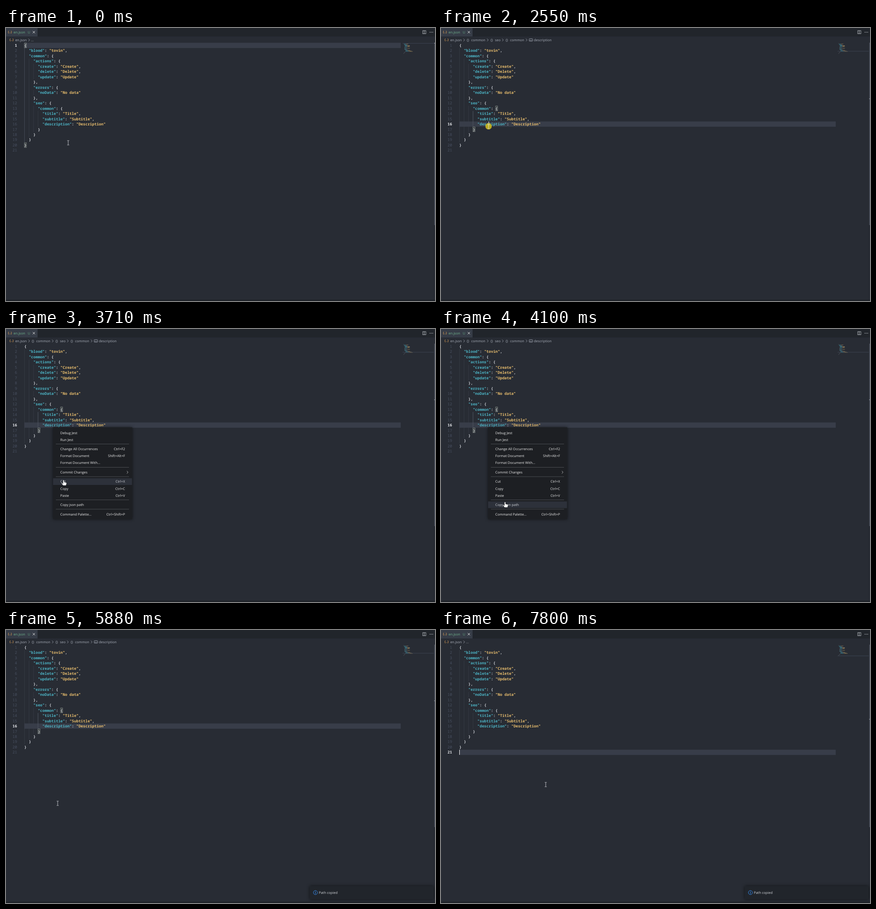
An HTML page that plays this animation: 938 px wide and 597 px high, repeating every 8000 ms.

```html
<!DOCTYPE html>
<html lang="en">
<head>
<meta charset="utf-8">
<title>Copy JSON path</title>
<style>
html, body { margin: 0; width: 100%; height: 100%; overflow: hidden; background: #282c34; }
svg { display: block; font: 7.45px "Open Sans", "Noto Sans", sans-serif; }
text { white-space: pre; text-rendering: geometricPrecision; }
.code { font: 600 8.24px "Noto Sans Mono", "DejaVu Sans Mono", monospace; }
.num { font-weight: 400; fill: #495162; text-anchor: end; }
.num.on { font-weight: 600; fill: #e4e6ea; }
.key { fill: #4db5c6; }
.str { fill: #e9be6e; }
.punct { fill: #d2d5db; }
.crumb { fill: #a9afba; }
.line { fill: none; stroke: #a9afba; stroke-width: .8; }
.menu { fill: #ececec; }
.menu .hover { fill: #cfd2d8; }
.float { filter: drop-shadow(0 0 3px #0009); }
</style>
</head>
<body>
<svg id="stage" width="938" height="597" viewBox="0 0 938 597"></svg>
<script>
const LOOP = 8000;
const ROW = 11.475, TOP = 32.3, LEFT = 40, CHAR = 4.944;

const data = {
  blood: "tovin",
  common: {
    actions: { create: "Create", delete: "Delete", update: "Update" },
    errors: { noData: "No data" },
    seo: { common: { title: "Title", subtitle: "Subtitle", description: "Description" } }
  }
};
const lines = JSON.stringify(data, null, 2).split("\n").concat("");

const rowTop = n => TOP + (n - 1) * ROW;
const miniY = n => 33 + (n - 1) * 1.16;
const colX = c => LEFT + c * CHAR;

const rect = (x, y, w, h, fill, more = "") =>
  `<rect x="${x}" y="${y}" width="${w}" height="${h}" fill="${fill}" ${more}/>`;
const text = (x, y, s, more = "") => `<text x="${x}" y="${y}" ${more}>${s}</text>`;
const path = (d, more = 'class="line"') => `<path d="${d}" ${more}/>`;
const group = (id, body, more = "") => `<g id="${id}" ${more}>${body}</g>`;
const chevron = (x, y, more) => path(`M${x - 1.4} ${y - 2.8}l2.8 2.8-2.8 2.8`, more);

function tokens(line) {
  const found = [];
  for (const m of line.matchAll(/"[^"]*"(?=(:?))|[^\s"]+/g)) {
    const kind = m[0][0] !== '"' ? "punct" : m[1] ? "key" : "str";
    found.push({ col: m.index, s: m[0], kind });
  }
  return found;
}

function codeRows() {
  return lines.map((line, i) => {
    const y = rowTop(i + 1) + 8.6;
    return text(24.2, y, i + 1, 'class="code num"') +
      tokens(line).map(t => text(colX(t.col), y, t.s, `class="code ${t.kind}"`)).join("");
  }).join("");
}

function miniMap() {
  return lines.map((line, i) => tokens(line).map(t =>
    rect(869 + t.col * .56, miniY(i + 1) + .4, t.s.length * .56, .75, "currentColor",
      `class="${t.kind}" opacity=".6"`)).join("")).join("");
}

// Vertical guides: column, first row, last row
const guides = [[0, 2, 19], [2, 4, 18], [4, 5, 7], [4, 10, 10], [4, 13, 17], [6, 14, 16]];
const guide = ([c, a, b], color) =>
  rect(colX(c), rowTop(a), .7, rowTop(b + 1) - rowTop(a), color);

const brace = (row, col) =>
  rect(colX(col) + .1, rowTop(row) + .6, CHAR - .3, ROW - 1.2, "#7c8a6422",
    'stroke="#868d8a" stroke-width=".8"');

const jsonIcon = (x, y) => text(x, y, "{..}", 'fill="#d39a55" font-size="7" font-weight="600"');

function crumbs() {
  const part = (x, s) => text(x, 28.9, s, 'class="crumb"');
  const obj = x => part(x, "{}");
  const sep = [102, 135, 187].map(x => chevron(x, 26.2)).join("");
  const word = rect(192.8, 23.4, 7.4, 5.4, "none", 'rx=".8" stroke="#a9afba" stroke-width=".8"') +
    text(196.5, 27.6, "abc", 'class="crumb" font-size="3.6" text-anchor="middle"');
  return group("shortCrumb", part(54.7, "...")) +
    group("fullCrumb", obj(56) + part(66, "common") + obj(108) + part(118, "seo") +
      obj(141) + part(151, "common") + sep + word + part(203, "description"));
}

const items = [
  [227, "Debug Jest"], [242, "Run Jest"],
  [262.5, "Change All Occurrences", "Ctrl+F2"], [277.6, "Format Document", "Shift+Alt+F"],
  [292.8, "Format Document With..."], [313.3, "Commit Changes"],
  [333.7, "Cut", "Ctrl+X"], [348.9, "Copy", "Ctrl+C"], [364, "Paste", "Ctrl+V"],
  [384.4, "Copy json path"], [404.9, "Command Palette...", "Ctrl+Shift+P"]
];

function menu() {
  const seps = [251.5, 302.6, 322.9, 373.7, 394]
    .map(y => rect(109, y - .4, 160, .8, "#55585d")).join("");
  const rows = items.map(([y, name, keys]) => `<g class="item">` + text(118.8, y + 2.6, name) +
    (keys ? text(260.3, y + 2.6, keys, 'text-anchor="end"') : "") + "</g>").join("");
  return group("menu", rect(103, 215, 173, 201, "#1d1f23", 'class="float"') +
    rect(103, 0, 172.5, 14.6, "#2d313a", 'id="hoverBar"') + seps + rows +
    chevron(265.6, 313.3, 'fill="none" stroke="#e0e0e0" stroke-width=".8"'), 'class="menu"');
}

const toast = () => group("toast",
  rect(664, 560, 271, 29, "#21252b", 'class="float"') +
  `<circle cx="676.5" cy="574.2" r="4.4" fill="none" stroke="#3794ff" stroke-width=".9"/>` +
  rect(676, 573.3, 1, 3.4, "#3794ff") + rect(676, 571.5, 1, 1, "#3794ff") +
  text(684, 576.9, "Path copied", 'fill="#d2d5da"'));

const pointers = () =>
  `<circle id="click" r="7" fill="#d8c51c" opacity=".82"/>` +
  group("beam", path("M-2.2-4.8H-.6L0-4.4.6-4.8H2.2M0-4.4V4.4M-2.2 4.8H-.6L0 4.4.6 4.8H2.2",
    'fill="none" stroke="#d8dade" stroke-width=".85"')) +
  group("hand", path("M-1.3.8Q0-1 1.3.8V4.6L5.2 5.4Q6.8 5.9 6.8 7.5L5.6 12.2H-1L-4.6 7.6Q-4.4 6-2.9 6.8L-1.3 8.2Z",
    'fill="#fff" stroke="#15171a" stroke-width=".7"')) +
  group("arrow", path("M0 0V11L2.6 8.6 4.3 12.3 6 11.5 4.3 8H7.6Z",
    'fill="#fff" stroke="#15171a" stroke-width=".6"'));

const stage = document.getElementById("stage");
stage.innerHTML =
  rect(0, 0, 938, 597, "#282c34") +
  rect(0, 0, 938, 18.6, "#21252b") + rect(0, 0, 69, 18.6, "#363c47") +
  jsonIcon(4, 11.4) + text(16.5, 11.9, "en.json", 'fill="#6fb58d"') +
  text(47.5, 11.9, "U", 'fill="#62a37e"') +
  path("M58.4 6.6l5 5m0-5l-5 5", 'stroke="#f0f0f0" stroke-width=".9"') +
  rect(911.2, 5.8, 6.8, 6.8, "none", 'stroke="#c9ccd2" stroke-width=".8"') +
  rect(914.2, 5.8, .8, 6.8, "#c9ccd2") +
  [927, 930, 933].map(x => `<circle cx="${x}" cy="9.3" r=".8" fill="#c9ccd2"/>`).join("") +
  jsonIcon(7.6, 28.4) + text(20.2, 28.9, "en.json", 'class="crumb"') + chevron(50.4, 26.2) + crumbs() +
  rect(LEFT, 0, 823, ROW, "#383d49", 'id="rowBar"') +
  guides.map(g => guide(g, "#3a3f49")).join("") +
  group("outer", guide(guides[0], "#4b515d") + brace(1, 0) + brace(20, 0)) +
  group("inner", guide(guides[5], "#59606d") + brace(13, 16) + brace(17, 6)) +
  codeRows() + miniMap() +
  rect(867, 0, 69, .9, "#3d4554", 'id="miniBar"') +
  rect(935.4, 32, .6, 562, "#20242b") + rect(936, 32, 2, 399, "#454b57") +
  rect(936, 0, 2, 1.4, "#8a909b", 'id="tick"') +
  rect(0, 594, 938, 3, "#1f2329") +
  rect(0, 0, 1, ROW - .3, "#fff", 'id="caret"') +
  toast() + menu() + pointers();

const el = id => document.getElementById(id);
const show = (id, on) => el(id).setAttribute("visibility", on ? "visible" : "hidden");
const place = (id, x, y) => el(id).setAttribute("transform", `translate(${x} ${y})`);
const nums = [...document.querySelectorAll(".num")];
const rows = [...document.querySelectorAll(".item")];

// Pointer moves in hops: start, end, hop count, way points
const moves = [
  [760, 1300, 8, [[138, 249], [140, 244], [130, 230], [114, 214], [110, 212]]],
  [1530, 1760, 4, [[109, 213], [104, 215]]],
  [3330, 4100, 11, [[106, 242], [118, 300], [131, 350], [137, 370], [140, 378]]],
  [4170, 4250, 2, [[140, 384], [139, 389]]],
  [5240, 6040, 11, [[139, 389], [139, 389], [139, 389], [126, 384], [113, 379], [112, 379]]],
  [6110, 6730, 9, [[130, 386], [300, 440], [520, 520], [650, 568], [690, 578]]],
  [7190, 7800, 9, [[670, 570], [428, 447], [250, 348], [229, 338], [229, 338]]]
];
const caretOn = [[210, 760], [1220, 1760], [2240, 2623], [5400, 5880], [6380, 6880], [7380, LOOP]];
const clicks = [[2470, 2700], [5240, 5400], [7570, 7720]];
const within = (t, spans) => spans.some(([a, b]) => t >= a && t < b);

function pointerAt(t) {
  const move = moves.filter(m => t >= m[0]).pop();
  if (!move) return [136, 251];
  const [a, b, hops, pts] = move;
  const hop = Math.min(hops - 1, Math.floor((t - a) / (b - a) * (hops - 1) + .01));
  const u = hop / (hops - 1) * (pts.length - 1);
  const i = Math.min(pts.length - 2, Math.floor(u));
  return [0, 1].map(k => pts[i][k] + (pts[i + 1][k] - pts[i][k]) * (u - i));
}

function draw(t) {
  const row = t < 2547 ? 1 : t < 7650 ? 16 : 21;
  const menuOpen = t >= 2623 && t < 5400;
  const [x, y] = pointerAt(t);
  const hover = menuOpen ? items.findIndex(i => Math.abs(i[0] - y) < 7.6) : -1;
  const onToast = t > 5480 && x > 664 && y > 560;
  const kind = hover >= 0 ? "hand" : menuOpen || onToast ? "arrow" : "beam";

  el("rowBar").setAttribute("y", rowTop(row));
  el("miniBar").setAttribute("y", miniY(row));
  el("tick").setAttribute("y", 32.5 + (row - 1) * 8.1);
  nums.forEach((n, i) => n.classList.toggle("on", i + 1 === row));
  show("outer", row === 1);
  show("inner", row === 16);
  show("shortCrumb", row !== 16);
  show("fullCrumb", row === 16);

  show("caret", within(t, caretOn));
  place("caret", row === 16 ? 104 : LEFT, rowTop(row));

  show("menu", menuOpen);
  show("hoverBar", hover >= 0);
  if (hover >= 0) el("hoverBar").setAttribute("y", items[hover][0] - 7.3);
  rows.forEach((r, i) => r.classList.toggle("hover", i === hover));

  el("toast").setAttribute("opacity", Math.max(0, Math.min(1, (t - 5440) / 300)));

  show("click", within(t, clicks));
  place("click", x, y);
  for (const id of ["beam", "hand", "arrow"]) {
    show(id, id === kind);
    place(id, x, y);
  }
}

const start = performance.now();
function tick() {
  draw((performance.now() - start) % LOOP);
  requestAnimationFrame(tick);
}
draw(0);
requestAnimationFrame(tick);
</script>
</body>
</html>
```
